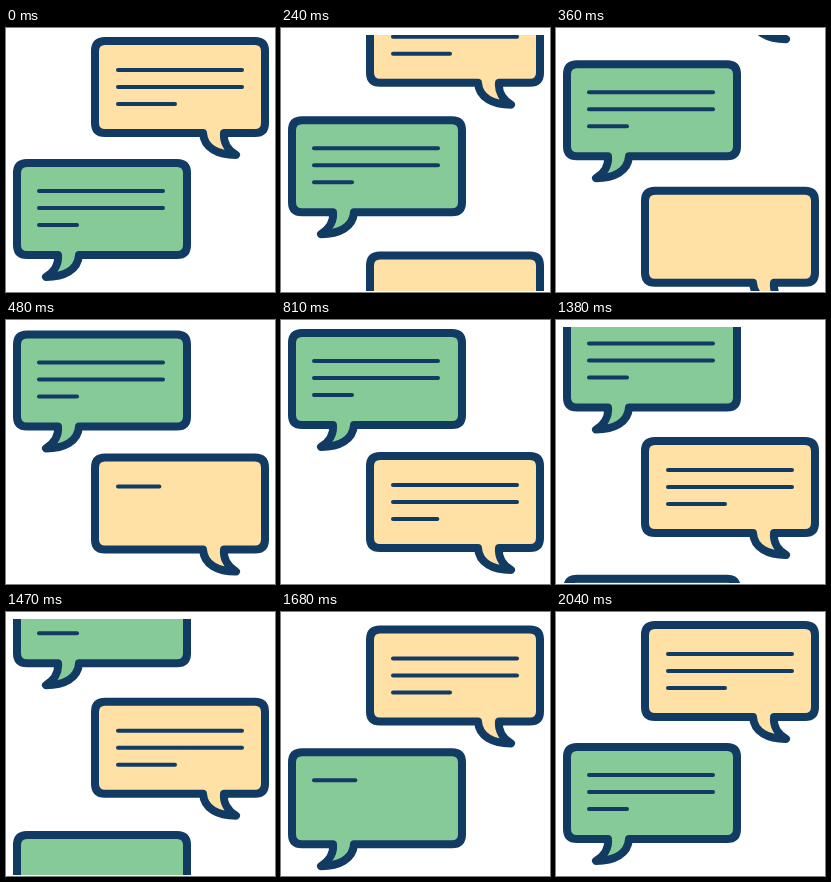
An HTML page with a canvas that plays this animation: 269 by 264 pixels, repeating every 2430 ms.

```html
<!DOCTYPE html>
<html lang="en">
<head>
<meta charset="utf-8">
<title>Chat bubbles</title>
<style>
html, body { margin: 0; width: 100%; height: 100%; overflow: hidden; background: #fff; }
canvas { display: block; width: 269px; height: 264px; }
</style>
</head>
<body>
<canvas></canvas>
<script>
const W = 269, H = 264, LOOP = 2430, NAVY = '#123b63';
const TOP = 13, EXIT = 143, ENTER = 141;

const canvas = document.querySelector('canvas');
const ctx = canvas.getContext('2d');
const dpr = window.devicePixelRatio || 1;
canvas.width = W * dpr;
canvas.height = H * dpr;

// Bubble outline with its tail at the lower right
const outline = new Path2D(
  'M10 0H160Q170 0 170 10V82Q170 92 160 92H129' +
  'C128 101 133 109 141 114C123 114 109 107 108 92' +
  'H10Q0 92 0 82V10Q0 0 10 0Z');

const yellow = { x: 89, low: 136, fill: '#ffe0a5', lineX: 23, lineY: 29, widths: [124, 124, 57] };
const green = { x: 11, low: 135, fill: '#86ca98', lineX: 22, lineY: 28, widths: [124, 124, 38], flip: true };

// One exchange: the upper bubble leaves, the lower rises, a new one enters and is written
const turns = [
  { start: 15, length: 522, write: 436, upper: yellow, lower: green },
  { start: 1227, length: 548, write: 1636, upper: green, lower: yellow }
];
const LINE_TIME = 135;

const clamp = v => Math.min(1, Math.max(0, v));
const half = v => 0.5 * Math.pow(2 * v, 2.45);
const ease = v => v < 0.5 ? half(v) : 1 - half(1 - v);

function bubble(b, y, written = 3) {
  ctx.save();
  ctx.translate(b.x, y);
  ctx.save();
  if (b.flip) {
    ctx.translate(170, 0);
    ctx.scale(-1, 1);
  }
  ctx.fillStyle = b.fill;
  ctx.fill(outline);
  ctx.lineWidth = 8;
  ctx.stroke(outline);
  ctx.restore();

  ctx.lineWidth = 4;
  b.widths.forEach((w, i) => {
    const p = clamp(written - i);
    if (!p) return;
    const ly = b.lineY + 17 * i;
    ctx.beginPath();
    ctx.moveTo(b.lineX, ly);
    ctx.lineTo(b.lineX + w * p, ly);
    ctx.stroke();
  });
  ctx.restore();
}

function draw(now) {
  const t = now % LOOP;
  const turn = turns[t < turns[1].start ? 0 : 1];
  const { upper, lower } = turn;
  const p = ease(clamp((t - turn.start) / turn.length));

  ctx.setTransform(dpr, 0, 0, dpr, 0, 0);
  ctx.fillStyle = '#fff';
  ctx.fillRect(0, 0, W, H);
  ctx.save();
  ctx.beginPath();
  ctx.rect(7, 7, 256, 256);
  ctx.clip();
  ctx.strokeStyle = NAVY;
  ctx.lineCap = ctx.lineJoin = 'round';

  bubble(upper, TOP - EXIT * p);
  bubble(lower, lower.low + (TOP - lower.low) * p);
  bubble(upper, upper.low + ENTER * (1 - p), (t - turn.write) / LINE_TIME);
  ctx.restore();
}

const begin = performance.now();
function frame() {
  draw(performance.now() - begin);
  requestAnimationFrame(frame);
}
frame();
</script>
</body>
</html>
```
